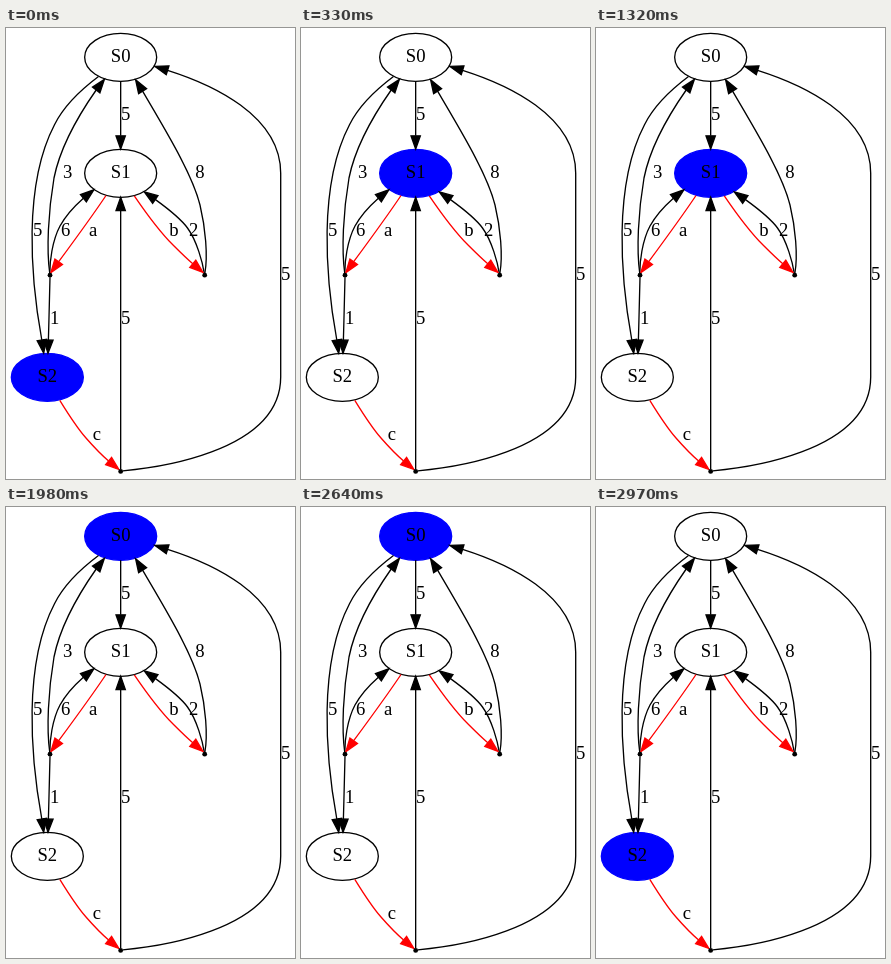
Animation of 289x451 px, one loop 3.3 s. Source, as an HTML page with a canvas:

```html
<!DOCTYPE html>
<html lang="en">
<head>
<meta charset="utf-8">
<title>State graph</title>
<style>
html, body { margin: 0; width: 100%; height: 100%; overflow: hidden; background: #fff; }
canvas { display: block; width: 289px; height: 451px; }
</style>
</head>
<body>
<canvas id="stage"></canvas>
<script>
const W = 289, H = 451, LOOP = 3300;
const canvas = document.getElementById('stage');
const ctx = canvas.getContext('2d');
const ratio = window.devicePixelRatio || 1;
canvas.width = Math.round(W * ratio);
canvas.height = Math.round(H * ratio);

const states = [
  { name: 'S0', x: 114.67, y: 29.33 },
  { name: 'S1', x: 114.67, y: 145.33 },
  { name: 'S2', x: 41.33, y: 349.33 }
];
const dots = [[44, 247.2], [198.7, 247.2], [114.67, 443.4]];

// Active state from each start time on
const steps = [[0, 2], [330, 1], [990, 0], [1320, 1], [1980, 0], [2310, 2], [2640, 0], [2970, 2]];

// Each path ends at the base of its arrowhead
const edge = (d, base, tip, color = '#000') =>
  ({ line: new Path2D(`${d} ${base}`), base, tip, color });
const edges = [
  edge('M114.67 53.3 L', [114.67, 107.8], [114.67, 121.1]),
  edge('M92.5 48.5 C76.5 60.5 58 77.5 48.5 96.7 C17 157 24.5 250', [35.8, 312], [37.7, 325.2]),
  edge('M43.7 245 C40.5 222 42 185 48 150 C54 120 72 88', [90.2, 62], [98.4, 51.4]),
  edge('M43.8 245 C43.8 234 46 213 54 198 C59.5 188 68 178.5', [77.4, 170.2], [87.8, 161.8]),
  edge('M44 249.3 C43.7 262 43 290', [42.4, 312], [42, 325.2]),
  edge('M198.9 245 C202 228 199.5 200 194 177 C186 145 158 100', [136.6, 63.2], [129.6, 51.8]),
  edge('M198.2 245 C196.7 235 191 213 181.5 200 C173.5 189 161 180', [149.3, 171.5], [138.3, 163.9]),
  edge('M114.67 441 L', [114.67, 182.6], [114.67, 169.3]),
  edge('M116.8 442.8 C143 440.5 274.7 426 274.7 349 V145.3 C274.7 87 205 56', [161.6, 42.3], [148.8, 38.4]),
  edge('M100 167.5 C87 187 65 217', [52.7, 233.7], [44.9, 244.5], '#f00'),
  edge('M128.3 167.8 C140 185 154 204 167.3 217.3 C174 224 180 230', [186.8, 235.8], [197, 244.4], '#f00'),
  edge('M53.8 372.3 C61 384 70 398.5 80 410 C87 418 95 426.5', [102.6, 433], [112.9, 441.5], '#f00')
];

// Text, centre x, baseline
const labels = [
  ['5', 119.7, 92.2], ['5', 31.7, 208.2], ['3', 61.7, 150.2], ['6', 59.7, 208.2],
  ['a', 87.2, 208.2], ['b', 168, 208.2], ['2', 187.7, 208.2], ['8', 193.8, 150.2],
  ['1', 48.7, 296.2], ['5', 119.7, 296.2], ['5', 279.7, 252.2], ['c', 91, 412.2]
];

function drawState(s, active) {
  ctx.beginPath();
  ctx.ellipse(s.x, s.y, 36, 24, 0, 0, Math.PI * 2);
  ctx.fillStyle = active ? '#00f' : '#fff';
  ctx.strokeStyle = active ? '#00f' : '#000';
  ctx.fill();
  ctx.stroke();
  drawText(s.name, s.x, s.y + 5);
}

function drawText(text, x, y) {
  ctx.fillStyle = '#000';
  ctx.fillText(text, x, y);
}

function drawEdge({ line, base, tip, color }) {
  ctx.strokeStyle = ctx.fillStyle = color;
  ctx.stroke(line);
  const dx = tip[0] - base[0], dy = tip[1] - base[1];
  const k = 4.67 / Math.hypot(dx, dy);
  ctx.beginPath();
  ctx.moveTo(...tip);
  ctx.lineTo(base[0] - dy * k, base[1] + dx * k);
  ctx.lineTo(base[0] + dy * k, base[1] - dx * k);
  ctx.closePath();
  ctx.fill();
  ctx.stroke();
}

function drawDot([x, y]) {
  ctx.beginPath();
  ctx.arc(x, y, 2.4, 0, Math.PI * 2);
  ctx.fillStyle = '#000';
  ctx.fill();
}

function draw(active) {
  ctx.setTransform(ratio, 0, 0, ratio, 0, 0);
  ctx.fillStyle = '#fff';
  ctx.fillRect(0, 0, W, H);
  ctx.lineWidth = 1.33;
  ctx.font = '18.67px "Liberation Serif", "Times New Roman", serif';
  ctx.textAlign = 'center';
  states.forEach((s, i) => drawState(s, i === active));
  edges.forEach(drawEdge);
  dots.forEach(drawDot);
  labels.forEach(l => drawText(...l));
}

const start = performance.now();
function tick() {
  const t = (performance.now() - start) % LOOP;
  draw(steps.filter(([from]) => from <= t).pop()[1]);
  requestAnimationFrame(tick);
}
tick();
</script>
</body>
</html>
```
